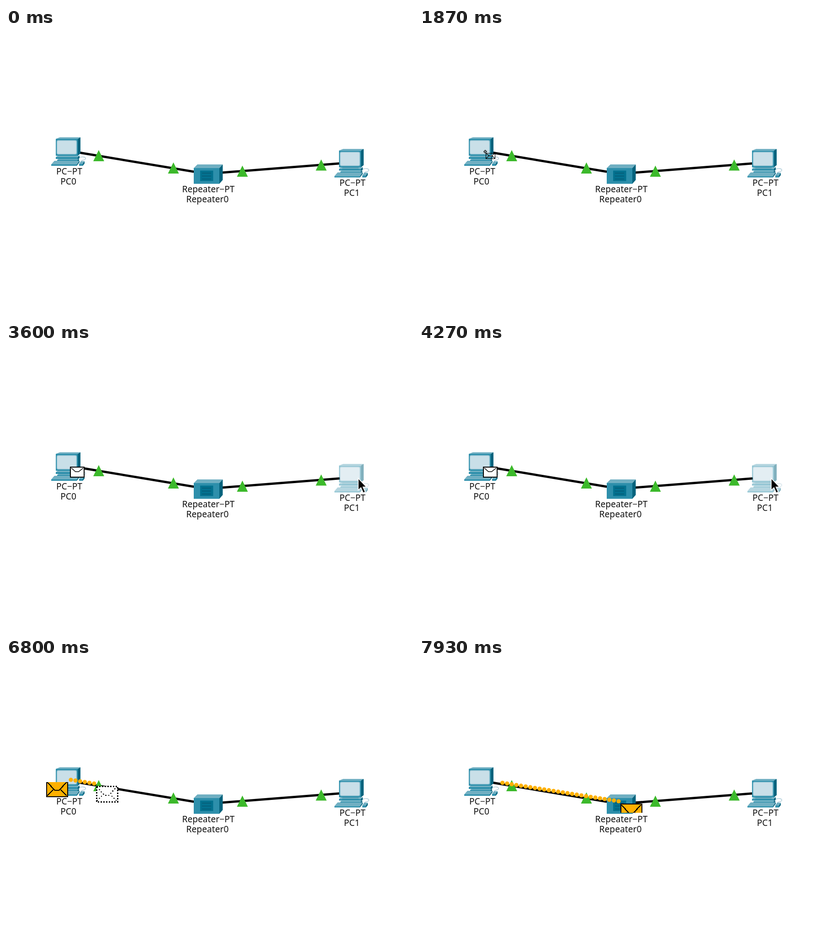
An HTML page that plays this animation: 891 px wide and 629 px high, repeating every 8000 ms.

```html
<!DOCTYPE html>
<html lang="en">
<head>
<meta charset="utf-8">
<title>Repeater network</title>
<style>
  html, body { margin: 0; width: 100%; height: 100%; overflow: hidden; background: #fff; }
  svg { display: block; width: 100%; height: 100%; }
  text { font: 500 19.2px "Noto Sans", "Open Sans", sans-serif; fill: #111; text-anchor: middle; }
  .front { fill: #2d8fab; }
  .top { fill: #70afc2; }
  .side { fill: #06637d; }
  .ink { fill: none; stroke: #000; }
  .crisp { shape-rendering: crispEdges; }
</style>
</head>
<body>
<svg viewBox="0 0 891 629">
  <defs>
    <g id="pc">
      <path d="M161 284C168 281 176 283 174 287S161 289 167 293" fill="none" stroke="#b4cfdb" stroke-width="1.6"/>
      <path class="side" d="M116 279H152V284H116ZM157 283L161 279V285L156 290ZM156 290L160 287V293L155 296Z"/>
      <path class="front" d="M109 283H157V287H109ZM112 289H156V293H112Z"/>
      <path class="top" d="M109 283L113 280H161L157 283ZM112 289L115 287H159L156 289Z"/>
      <path class="top" d="M106 291H161L155 299H99Z"/>
      <path class="front" d="M99 299H155V302H99Z"/>
      <path class="side" d="M155 299L161 291V294L155 302Z"/>
      <path class="front" d="M160 298L164 292H172L168 302H160Z"/>
      <path class="top" d="M160 298L164 292H172L168 298Z"/>
      <path class="side" d="M168 298L172 292V297L168 302Z"/>
      <path class="front" d="M109 243H157V280H109Z"/>
      <path class="top" d="M109 243L118 239.500H163L157 243Z"/>
      <path class="side" d="M157 243L163 239.500V275L157 280Z"/>
      <rect x="111.500" y="246.500" width="43" height="30" rx="3" fill="#c9dfe8" stroke="#8fc0d0" stroke-width="1.500"/>
    </g>
    <path id="flap" class="ink" d="M2 3L19 21H28L45 3M2 33L15 20M45 33L32 20"/>
    <g id="packet" class="crisp">
      <rect x="1" y="1" width="46" height="34" fill="#ffb000" stroke="#000" stroke-width="2"/>
      <use href="#flap" stroke-width="2.200"/>
    </g>
    <path id="arrowUp" d="M0 0L12 24.500H-12Z" fill="#3cb92b"/>
    <clipPath id="sentClip"><rect id="sentRect" x="-1" width="50" height="40"/></clipPath>
    <clipPath id="gotClip"><rect id="gotRect" x="-1" y="-1" width="50"/></clipPath>
  </defs>

  <path d="M160 273L413 315.300M472 317L731 296.800" class="ink" stroke-width="5"/>
  <use href="#pc" id="pc0"/>
  <use href="#pc" id="pc1" x="620" y="25.500"/>
  <g id="repeater">
    <path class="front" d="M411 307H467V341.500H411Z"/>
    <path class="top" d="M411 307L419 299H474.500L467 307Z"/>
    <path class="side" d="M467 307L474.500 299V333L467 341.500Z"/>
    <path d="M425 312.500H453.500V335.500H425Z" fill="#03718f"/>
    <path d="M429 318H449M429 324.500H449M429 331H449" stroke="#075a74" stroke-width="1.500"/>
  </g>
  <use href="#arrowUp" x="203" y="267.500"/>
  <use href="#arrowUp" x="366.500" y="294.500"/>
  <use href="#arrowUp" x="517.500" y="301.500"/>
  <use href="#arrowUp" x="690" y="288"/>
  <text x="138.500" y="321">PC−PT</text><text x="136.500" y="343">PC0</text>
  <text x="443" y="360">Repeater−PT</text><text x="441" y="382">Repeater0</text>
  <text x="758.500" y="346">PC−PT</text><text x="757" y="368">PC1</text>

  <g id="draft" transform="translate(140 271)">
    <rect x="1" y="1" width="30" height="22" fill="#fff" stroke="#000" stroke-width="2"/>
    <path d="M3 3L12 11H19L29 3" class="ink" stroke-width="1.600"/>
  </g>
  <g id="dots" fill="#ffb000"></g>
  <g id="source"><g clip-path="url(#sentClip)"><use href="#packet"/></g></g>
  <g id="ghost" class="crisp">
    <rect x="1" y="1" width="46" height="34" fill="#fff" stroke="#000" stroke-width="3" stroke-dasharray="3 3"/>
    <use href="#flap" stroke-width="2.200" stroke-dasharray="2.500 4"/>
  </g>
  <g transform="translate(441 319)"><g clip-path="url(#gotClip)"><use href="#packet"/></g></g>

  <g id="picker" class="ink" stroke-width="1.100">
    <path d="M-1 -3H1V-1H3V1H1V3H-1V1H-3V-1H-1Z"/>
    <path d="M1.500 3.500H21.500V15.500H1.500ZM1.500 3.500L10 10H13L21.500 3.500M1.500 15.500L8 9M21.500 15.500L15 9"/>
  </g>
  <path id="pointer" transform="translate(771 296.500)" d="M0 0V26L6 20.500L11 32L15.500 30L10.500 19H18Z" stroke="#fff" stroke-width="1.600"/>
</svg>
<script>
const LOOP = 8000, SEND = 6590, STEP = 39.5, HOPS = 29;
const $ = id => document.getElementById(id);
const show = (id, on) => $(id).style.display = on ? "" : "none";
const move = (id, x, y) => $(id).setAttribute("transform", `translate(${x} ${y})`);
const clamp = (v, lo, hi) => Math.min(hi, Math.max(lo, v));
const between = (t, a, b) => t >= a && t < b;
const trail = hop => [142 + 10.17 * hop, 267 + 1.62 * hop];

const dots = Array.from({ length: HOPS + 1 }, (_, hop) => {
  const dot = document.createElementNS("http://www.w3.org/2000/svg", "circle");
  const [cx, cy] = trail(hop);
  for (const [key, value] of Object.entries({ cx, cy, r: 4.6 })) dot.setAttribute(key, value);
  return $("dots").appendChild(dot);
});

// Cursor stops: time, x, y
const stops = [[1400, 190, 116], [1800, 145, 271], [2250, 145, 271],
               [2640, 440, 206], [3250, 771, 297], [3530, 779, 302]];

function cursorAt(t) {
  const i = clamp(stops.findIndex(stop => stop[0] > t), 1, stops.length - 1);
  const [a, b] = [stops[i - 1], stops[i]];
  const u = clamp((t - a[0]) / (b[0] - a[0]), 0, 1);
  const eased = u * u * (3 - 2 * u);
  return [a[1] + (b[1] - a[1]) * eased, a[2] + (b[2] - a[2]) * eased];
}

function draw(t) {
  $("pc0").style.opacity = between(t, 1930, 2300) ? 0.5 : 1;
  $("pc1").style.opacity = between(t, 3200, 4330) ? 0.5 : 1;
  show("picker", between(t, 1400, 3560));
  if (between(t, 1400, 3560)) move("picker", ...cursorAt(t));
  show("pointer", between(t, 3560, 4800));
  show("draft", between(t, 2000, 4800));

  const hop = Math.floor((t - SEND) / STEP);
  const sending = hop >= 0;
  dots.forEach((dot, i) => dot.style.display = i <= hop && i >= hop - HOPS ? "" : "none");

  show("source", t >= 4800 && hop <= HOPS);
  move("source", sending ? 88 : 136, 269);
  $("sentRect").setAttribute("y", sending ? Math.round(0.64 * hop) : -1);

  show("ghost", sending && hop <= HOPS);
  const [x, y] = trail(clamp(hop, 0, HOPS));
  move("ghost", Math.round(x + 4), Math.round(y + 4.5));
  $("gotRect").setAttribute("height", clamp(5.3 * (hop - HOPS), 0, 40));
}

function tick(now) {
  draw(now % LOOP);
  requestAnimationFrame(tick);
}
draw(0);
requestAnimationFrame(tick);
</script>
</body>
</html>
```
